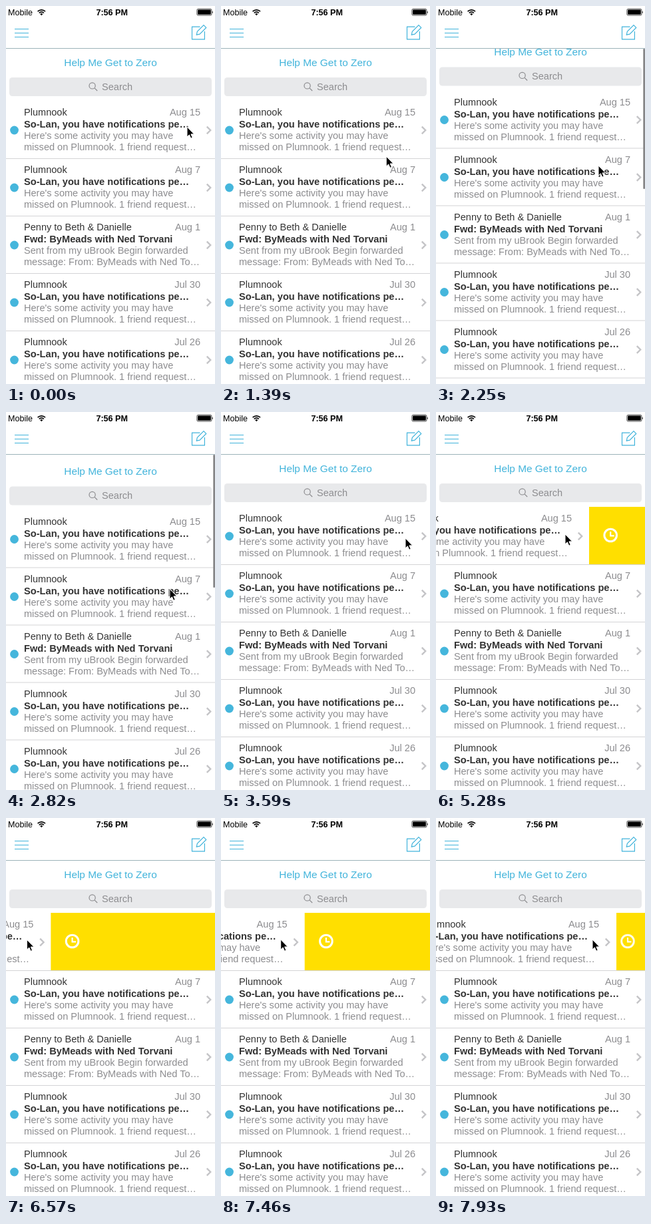
Write an HTML page that moves like this. It is 314 px wide and 566 px high and loops after 7.99 s.

```html
<!DOCTYPE html>
<html lang="en">
<head>
<meta charset="utf-8">
<title>Inbox swipe</title>
<style>
  html, body { margin: 0; width: 100%; height: 100%; overflow: hidden; background: #fff; }
  svg { display: block; width: 314px; height: 566px; }
  text { font: 14.55px "Liberation Sans", Arial, sans-serif; fill: #333; white-space: pre; }
  .subject { font-weight: 700; font-size: 14.65px; }
  .grey { fill: #8c8c8f; }
  .help { font-size: 15.4px; fill: #42b4db; text-anchor: middle; }
  .date { text-anchor: end; }
  .status { font-size: 12.6px; fill: #000; }
  .clock { font-weight: 700; text-anchor: middle; }
  .line { fill: none; stroke: #42b4db; stroke-width: 1.2; }
</style>
</head>
<body>
<svg viewBox="0 0 314 566">
  <rect width="314" height="566" fill="#fff"/>

  <g id="list">
    <text class="help" x="157" y="89.5">Help Me Get to Zero</text>
    <rect x="5" y="107" width="304" height="28" rx="4.5" fill="#e8e9eb"/>
    <g fill="none" stroke="#8c8c8f" stroke-width="1.2">
      <circle cx="129.6" cy="119.4" r="4.6"/>
      <path d="M133 122.8L137.2 127"/>
    </g>
    <text class="grey" x="144" y="125.6">Search</text>
    <g id="drawer">
      <rect id="panel" y="142" width="314" height="86" fill="#ffdf00"/>
      <g id="later" fill="none" stroke="#fff">
        <circle r="9.3" stroke-width="3"/>
        <path d="M0 -5.5V.8H5.5" stroke-width="2.2"/>
      </g>
    </g>
    <g id="rows"></g>
  </g>

  <rect id="bar" x="311.3" y="64" width="2.7" rx="1.3" fill="#858587"/>

  <g id="header">
    <rect width="314" height="63" fill="#fff"/>
    <rect y="63" width="314" height="1" fill="#9db3ba"/>
    <text class="status" x="3" y="14">Mobile</text>
    <g fill="none" stroke="#000" stroke-width="1.7">
      <path d="M47.6 8.2a8 8 0 0 1 11.4 0M49.7 10.5a5 5 0 0 1 7.2 0"/>
      <path d="M53.3 14.2L51.2 12a3 3 0 0 1 4.2 0z" fill="#000" stroke="none"/>
    </g>
    <text class="status clock" x="159.2" y="14">7:56 PM</text>
    <rect x="286.8" y="4.4" width="22.2" height="9.6" rx="2" fill="none" stroke="#000" stroke-width=".7"/>
    <rect x="288" y="5.6" width="19.8" height="7.2" rx="1"/>
    <path d="M309.8 7.4q2 1.8 0 3.6z"/>
    <path class="line" d="M13 34.5H34M13 40.5H34M13 46.5H34"/>
    <path class="line" d="M291.5 31.2H279.5V49.8H298.4V38"/>
    <path class="line" d="M286.3 43.1L287.3 38.4L297 28.7L300.7 32.4L291 42.1Z"/>
  </g>

  <path id="cursor" d="M0 0V15L3.4 11.8L5.8 17.2L8.2 16.2L5.9 10.9H10.6Z"
        fill="#000" stroke="#fff" stroke-width="1" stroke-linejoin="round"/>
</svg>

<script>
const LOOP = 7990, ROW = 86, TOP = 142;
const GRAB = 1900, RELEASE = 2900, GRAB_Y = 254.5;
const SWIPE = 4720, SWIPE_X = 282;
const $ = id => document.getElementById(id);

const notice = date => [
  "Plumnook", date, "So-Lan, you have notifications pe…",
  "Here's some activity you may have", "missed on Plumnook. 1 friend request…"
];
const mails = [
  notice("Aug 15"),
  notice("Aug 7"),
  ["Penny to Beth & Danielle", "Aug 1", "Fwd: ByMeads with Ned Torvani",
   "Sent from my uBrook Begin forwarded", "message: From: ByMeads with Ned To…"],
  notice("Jul 30"),
  notice("Jul 26")
];

const label = (x, y, cls, str) =>
  `<text x="${x}" y="${y}" class="${cls}">${str.replace("&", "&amp;")}</text>`;

$("rows").innerHTML = mails.map(([from, date, subject, one, two], i) => `
  <g transform="translate(0 ${TOP + i * ROW})">
    <g class="mail">
      <circle cx="12.5" cy="44" r="6.4" fill="#45b6dc"/>
      ${label(27, 22, "", from)}
      ${label(292, 22, "grey date", date)}
      ${label(27, 40, "subject", subject)}
      ${label(27, 57, "grey", one)}
      ${label(27, 74, "grey", two)}
      <path d="M301.8 38.6L307.2 44L301.8 49.4" fill="none" stroke="#c4c4c7" stroke-width="2.4"/>
    </g>
    <rect y="86" width="314" height="1" fill="#d4d4d6"/>
  </g>`).join("");
const firstMail = document.querySelector(".mail");

const clamp = v => Math.min(1, Math.max(0, v));
const ease = (t, from, to) => 1 - (1 - clamp((t - from) / (to - from))) ** 2;
const move = (el, x, y) => el.setAttribute("transform", `translate(${x} ${y})`);

// The hand's path: each move eases out to a point and rests there.
const moves = [
  { from: 60, to: 170, x: 258, y: 182 },
  { from: 460, to: 630, x: 251, y: 216 },
  { from: 860, to: 1610, x: 248, y: 226 },
  { from: 1670, to: GRAB, x: 246, y: GRAB_Y },
  { from: GRAB, to: 2150, x: 244, y: 239 },
  { from: 2300, to: 2800, x: 246, y: 265 },
  { from: RELEASE, to: 3220, x: 260, y: 220 },
  { from: 3410, to: 3580, x: 277, y: 189 },
  { from: 3890, to: 4240, x: 291, y: 189 },
  { from: SWIPE, to: 5250, x: 194, y: 183 },
  { from: 6110, to: 6860, x: 3, y: 182 },
  { from: 7340, to: 7920, x: 235, y: 182 }
];

function hand(t) {
  return moves.reduce((p, m) => {
    const k = ease(t, m.from, m.to);
    return { x: p.x + (m.x - p.x) * k, y: p.y + (m.y - p.y) * k };
  }, { x: 272, y: 181 });
}

// The list follows the hand, resists past its top, and springs back on release.
function scrollAt(t) {
  if (t < GRAB) return 0;
  const pull = hand(Math.min(t, RELEASE)).y - GRAB_Y;
  return (pull > 0 ? pull * 0.43 : pull) * (1 - ease(t, RELEASE, 3150));
}

function draw(t) {
  const { x, y } = hand(t);
  const scroll = scrollAt(t);
  const shift = t < SWIPE ? 0 : Math.max(0, SWIPE_X - x);
  const edge = 318 - shift;

  move($("cursor"), x, y);
  move($("list"), 0, scroll);
  move(firstMail, -shift, 0);

  $("drawer").style.display = edge < 314 ? "" : "none";
  $("panel").setAttribute("x", edge);
  move($("later"), Math.min(288, edge + 32.2), 184.5);
  $("later").style.opacity = clamp((314 - edge) / 48);

  $("bar").setAttribute("height", 201.5 - 0.55 * scroll);
  $("bar").style.opacity = ease(t, GRAB, 1960) - ease(t, 3050, 3220);
}

const begin = performance.now();
function tick() {
  draw((performance.now() - begin) % LOOP);
  requestAnimationFrame(tick);
}
tick();
</script>
</body>
</html>
```
